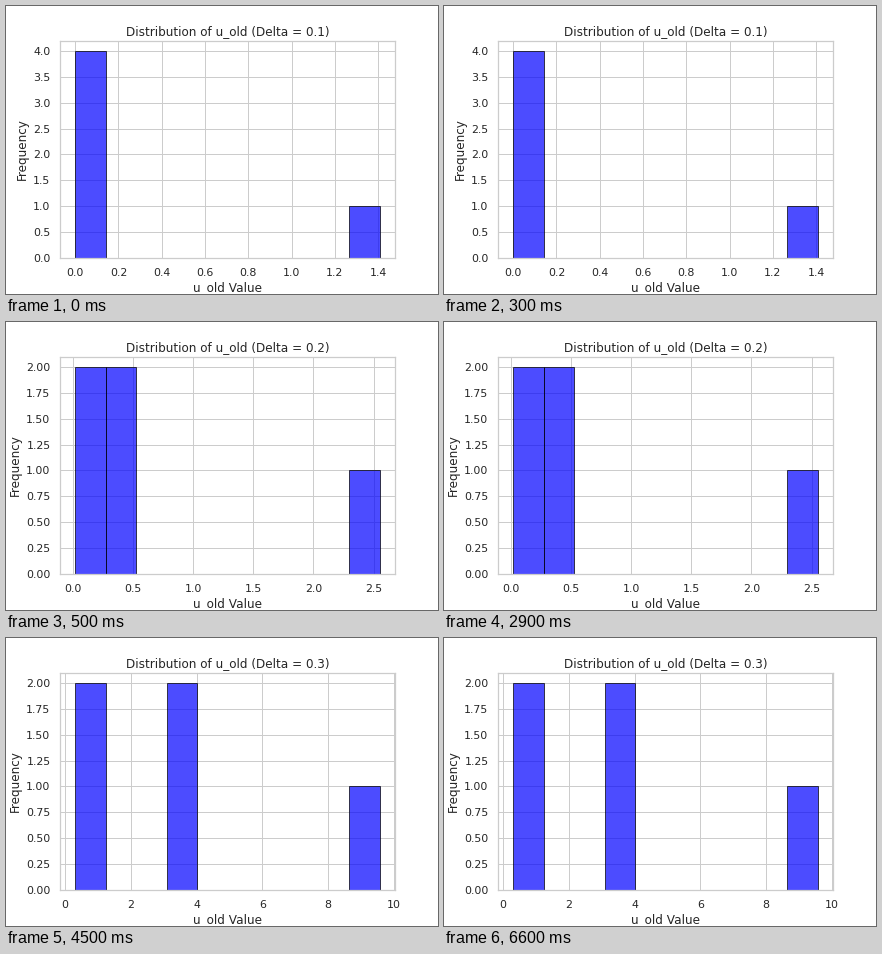
A matplotlib script that plays this animation: 432x288 px, repeating every 8 s.

```python
import numpy as np
import matplotlib.pyplot as plt
from matplotlib.animation import FuncAnimation

INK, LINE = ".15", ".8"

plt.rcParams.update({
    "font.family": "DejaVu Sans",
    "axes.titlesize": 12, "axes.labelsize": 12,
    "xtick.labelsize": 11, "ytick.labelsize": 11,
    "text.color": INK, "axes.labelcolor": INK,
    "xtick.color": INK, "ytick.color": INK,
    "axes.edgecolor": LINE, "axes.linewidth": 1.25,
    "axes.grid": True, "axes.axisbelow": True,
    "grid.color": LINE, "grid.linewidth": 1,
    "xtick.bottom": False, "ytick.left": False,
    "xtick.major.size": 6, "ytick.major.size": 6,
    "figure.subplot.bottom": 0.125,
})

STEP = 500
FRAMES = 16

fig, ax = plt.subplots(figsize=(6, 4), dpi=72)


def stage(frame):
    """Delta with the edge, inner and centre values of u_old."""
    if frame < 1:
        return 0.1, (0, 0.02, 1.4066)
    if frame < 9:
        return 0.2, (0.02, 0.4, 2.55)
    return 0.3, (0.305, 3.5, 9.572)


def draw(frame):
    delta, (edge, inner, centre) = stage(frame)
    u_old = np.array([edge, inner, centre, inner, edge])
    ax.clear()
    ax.hist(u_old, bins=10, color="blue", edgecolor="black", alpha=0.7)
    ax.set_title(f"Distribution of u_old (Delta = {delta})")
    ax.set_xlabel("u_old Value")
    ax.set_ylabel("Frequency")


anim = FuncAnimation(fig, draw, frames=FRAMES, init_func=lambda: draw(0),
                     interval=STEP, repeat=True, repeat_delay=0)
plt.show()
```
